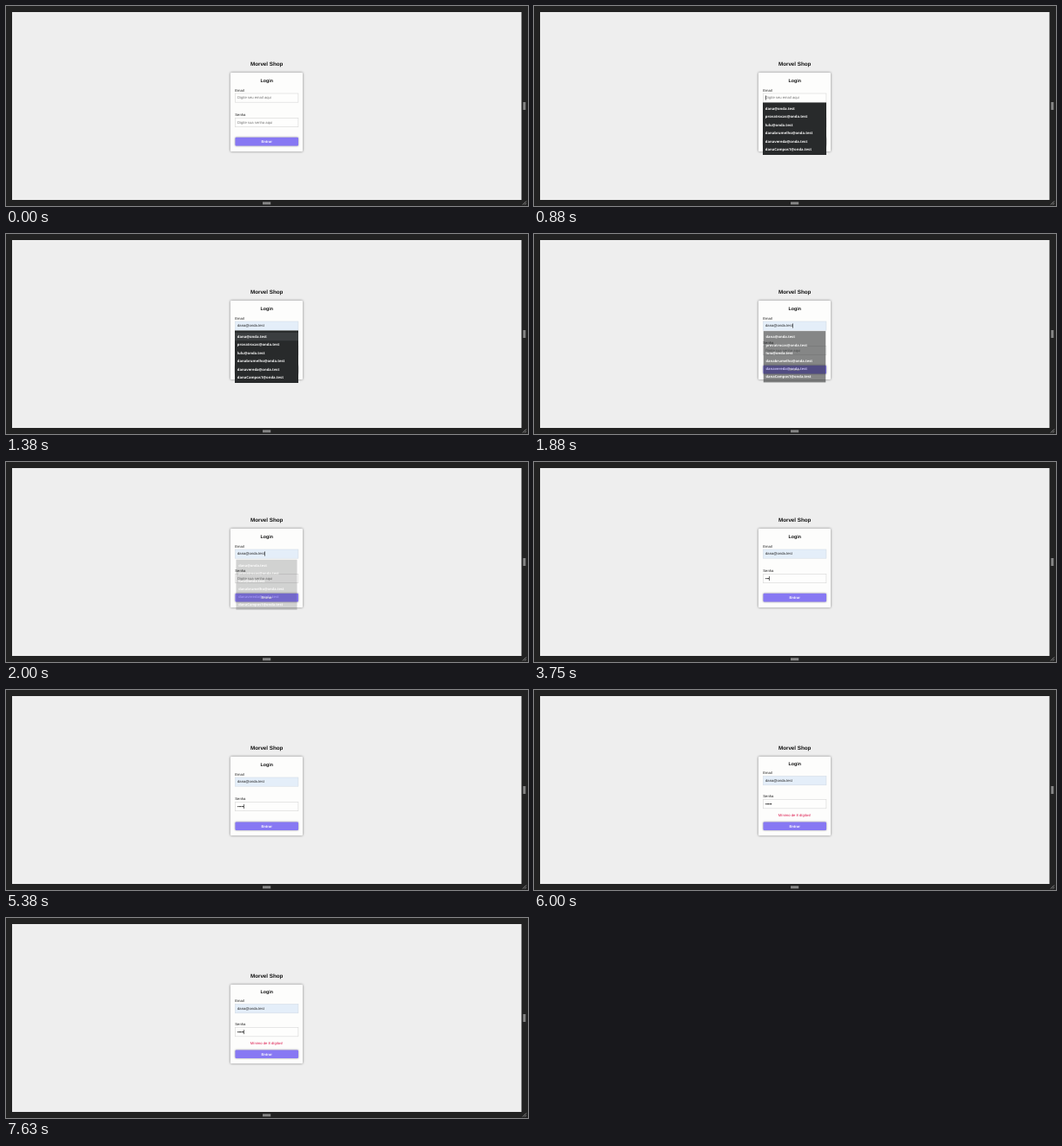
These frames come from a looping animation (600x231 px, 8000 ms). An HTML page:

```html
<!DOCTYPE html>
<html lang="pt-BR">
<head>
<meta charset="utf-8">
<title>Login</title>
<style>
  html, body { margin: 0; width: 100%; height: 100%; overflow: hidden; background: #222; }
  svg { display: block; width: 100%; height: 100%; }
  text { font: 4.2px "Liberation Sans", Arial, sans-serif; fill: #222; text-rendering: geometricPrecision; }
  .title { font-size: 6.25px; font-weight: bold; fill: #111; }
  .heading { font-size: 5.3px; font-weight: bold; fill: #111; }
  .middle { text-anchor: middle; }
  .hint { fill: #757575; }
  .field { fill: #fefefd; stroke: #d8d8d8; stroke-width: .6; }
  .filled { fill: #e4eef9; stroke: #d3dce6; }
  .card { fill: #fdfdfc; filter: drop-shadow(0 .6px 1.5px #0007); }
  .button rect { fill: #8778f3; filter: drop-shadow(.5px .8px .8px #0006); }
  .button text { fill: #fff; font-weight: bold; }
  .error { fill: #dc1a4e; }
  #menu text { font: 600 4.2px "Noto Sans", sans-serif; fill: #f4f4f4; }
  .grip { fill: #858585; }
</style>
</head>
<body>
<svg viewBox="0 0 600 231">
  <rect width="600" height="231" fill="#222"/>
  <rect x="7" y="7" width="585.5" height="217" fill="#eee"/>
  <rect class="grip" x="594.3" y="111" width="3" height="9"/>
  <rect class="grip" x="295" y="226.3" width="9.2" height="3"/>
  <path d="M594 229.5l4-4M596.3 229.5l1.7-1.7" stroke="#aaa" stroke-width=".8"/>

  <text class="title middle" x="299.7" y="69">Morvel Shop</text>
  <rect class="card" x="258" y="77" width="83" height="91" rx="1"/>
  <text id="heading" class="heading middle" x="299.7" y="87.7">Login</text>

  <g id="emailLabel"><text x="263.3" y="98.5">Email</text></g>
  <g id="email">
    <rect id="emailBox" class="field" x="263.6" y="101" width="72.3" height="10.2"/>
    <text id="emailText" x="266" y="107.3"></text>
    <rect id="emailCaret" y="103.4" width=".6" height="5.2" fill="#111"/>
  </g>

  <g id="password">
    <text x="263.3" y="127.2">Senha</text>
    <rect class="field" x="263.6" y="129.5" width="72.3" height="10.2"/>
    <text id="passwordHint" class="hint" x="266" y="135.9">Digite sua senha aqui</text>
    <g id="dots"></g>
    <rect id="passwordCaret" y="132" width=".6" height="5" fill="#111"/>
  </g>

  <text id="error" class="error middle" x="299.6" y="146.2">Mínimo de 8 dígitos!</text>
  <g id="button" class="button">
    <rect x="263.5" y="151.8" width="72.5" height="9.7" rx="1"/>
    <text class="middle" x="299.7" y="158.1">Entrar</text>
  </g>

  <g id="menu">
    <rect x="263" y="111.5" width="73" height="60.5" fill="#282a2b"/>
    <rect id="highlight" x="263" y="113.8" width="73" height="9.4" fill="#3b3e40"/>
  </g>
</svg>
<script>
const LOOP = 8000;
const EMAIL = 'dana@onda.test';
const SUGGESTIONS = ['dana', 'provatrocas', 'lulu', 'danabrumelho', 'danavereda', 'danaCampos1'];
const KEY_TIMES = [3500, 3630, 3750, 4000, 4130];
const DOT_PITCH = 1.46;
const EMAIL_CARET = [[880, 1380], [1880, 2380]];
const PASSWORD_CARET = [[2750, 3250], [3500, 4630], [5130, 6000], [6500, 7130], [7630, LOOP]];

const $ = id => document.getElementById(id);
const show = (id, on) => $(id).setAttribute('visibility', on ? 'visible' : 'hidden');
const move = (id, y) => $(id).setAttribute('transform', `translate(0 ${y})`);
const within = (t, spans) => spans.some(([from, to]) => t >= from && t < to);

function add(parent, tag, attributes, text = '') {
  const node = document.createElementNS('http://www.w3.org/2000/svg', tag);
  for (const key in attributes) node.setAttribute(key, attributes[key]);
  node.textContent = text;
  $(parent).append(node);
}

SUGGESTIONS.forEach((name, i) =>
  add('menu', 'text', { x: 265.8, y: 119.9 + i * 9.4 }, name + '@onda.test'));
KEY_TIMES.forEach((_, i) =>
  add('dots', 'circle', { cx: 266.8 + i * DOT_PITCH, cy: 134.6, r: .65, fill: '#111' }));

function drawEmail(t) {
  const filled = t >= 1380;
  $('emailBox').setAttribute('class', filled ? 'field filled' : 'field');
  $('emailText').setAttribute('class', filled ? '' : 'hint');
  $('emailText').textContent = filled ? EMAIL : 'Digite seu email aqui';
  $('emailCaret').setAttribute('x', filled ? 266.2 + $('emailText').getComputedTextLength() : 266);
  show('emailCaret', within(t, EMAIL_CARET));
}

function drawMenu(t) {
  show('menu', t >= 880 && t < 2130);
  show('highlight', t >= 1380 && t < 1880);
  const opacity = t < 1880 ? 1 : t < 2000 ? .56 : .2;
  const scale = t < 1880 ? 1 : t < 2000 ? .98 : .96;
  $('menu').setAttribute('opacity', opacity);
  $('menu').setAttribute('transform',
    `translate(299.5 141.7) scale(${scale}) translate(-299.5 -141.7)`);
}

function drawPassword(t) {
  const typed = KEY_TIMES.filter(time => t >= time).length;
  [...$('dots').children].forEach((dot, i) =>
    dot.setAttribute('visibility', i < typed ? 'visible' : 'hidden'));
  show('passwordHint', !typed);
  $('passwordCaret').setAttribute('x', 266 + typed * DOT_PITCH);
  show('passwordCaret', within(t, PASSWORD_CARET));
}

function drawLayout(t) {
  const failed = t >= 5750;
  show('error', failed);
  move('heading', failed ? -.8 : 0);
  move('emailLabel', failed ? -1.1 : 0);
  move('email', failed ? -1.4 : 0);
  move('password', failed ? -2.9 : 0);
  move('button', t < 5380 ? 0 : within(t, [[5630, 5880]]) ? 1.1 : .6);
}

function frame() {
  const t = performance.now() % LOOP;
  drawEmail(t);
  drawMenu(t);
  drawPassword(t);
  drawLayout(t);
  requestAnimationFrame(frame);
}
frame();
</script>
</body>
</html>
```
